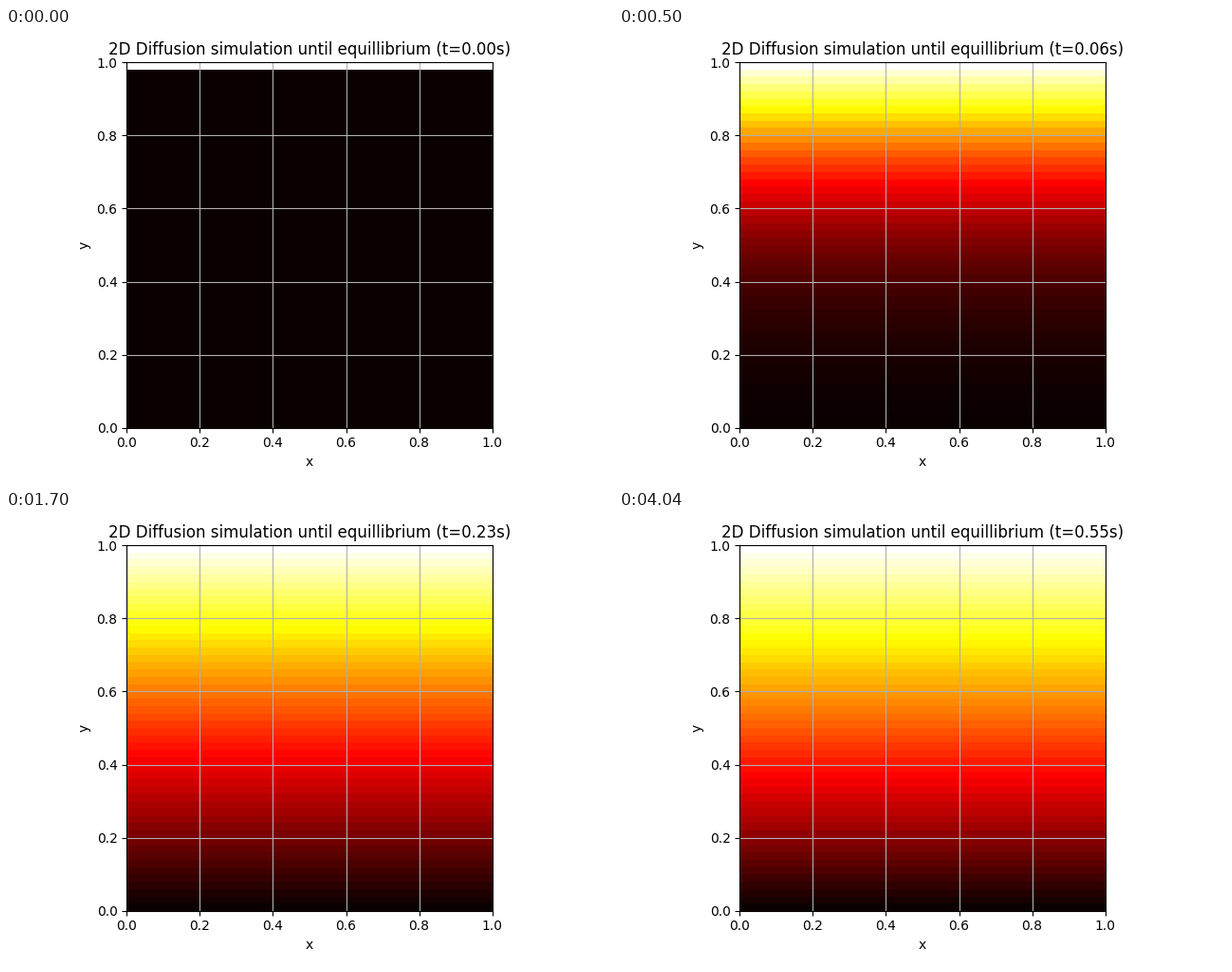
Write a matplotlib script that moves like this. It is 640 px wide and 480 px high and loops after 4160 ms.

```python
import matplotlib.pyplot as plt
import numpy as np
from matplotlib.animation import FuncAnimation

ROWS = 50            # grid rows between the cold bottom and the hot top
DT = 1e-4            # time step, a quarter of the cell size squared
STEPS = 71           # time steps between two pictures
TICK = 20            # ms
TICKS = 208
PAUSE = 5            # ticks the last picture of a burst stays
WIDTH, HEIGHT, DPI = 640, 480, 100

# Pictures come in short bursts of two or three, each followed by a pause.
BURSTS = "22323223232323232323233232223232"
LONG_PAUSE = (26, 31)


def schedule():
    """Picture index for every tick."""
    shown, index = [], 0
    for n, size in enumerate(map(int, BURSTS)):
        hold = PAUSE + (n in LONG_PAUSE)
        for k in range(size):
            shown += [index] * (hold if k == size - 1 else 1)
            index += 1
    return shown


def diffuse(count):
    """Temperature profiles from the bottom row to the top row."""
    c = np.zeros(ROWS)
    c[-1] = 1
    rate = DT * ROWS ** 2
    profiles = [c.copy()]
    for _ in range(count - 1):
        for _ in range(STEPS):
            c[1:-1] += rate * (c[2:] - 2 * c[1:-1] + c[:-2])
        profiles.append(c.copy())
    return profiles


def title_text(index):
    t = index * STEPS * DT
    return f"2D Diffusion simulation until equillibrium (t={t:.2f}s)"


shown = schedule()
profiles = diffuse(shown[-1] + 1)

plt.rcParams["text.kerning_factor"] = 6    # unkerned text
fig, ax = plt.subplots(figsize=(WIDTH / DPI, HEIGHT / DPI), dpi=DPI)
image = ax.imshow(profiles[0][:, None], cmap="hot", vmin=0, vmax=1,
                  origin="lower", extent=(0, 1, 0, 1),
                  interpolation="nearest")
title = ax.set_title(title_text(0))
ax.set_xlabel("x")
ax.set_ylabel("y")
ax.grid(True)
fig.tight_layout()
fig.subplots_adjust(top=fig.subplotpars.top + 1 / HEIGHT)


def update(tick):
    index = shown[tick]
    image.set_data(profiles[index][:, None])
    title.set_text(title_text(index))
    return image, title


anim = FuncAnimation(fig, update, frames=TICKS, interval=TICK,
                     init_func=lambda: update(0), repeat=True, repeat_delay=0)
plt.show()
```
